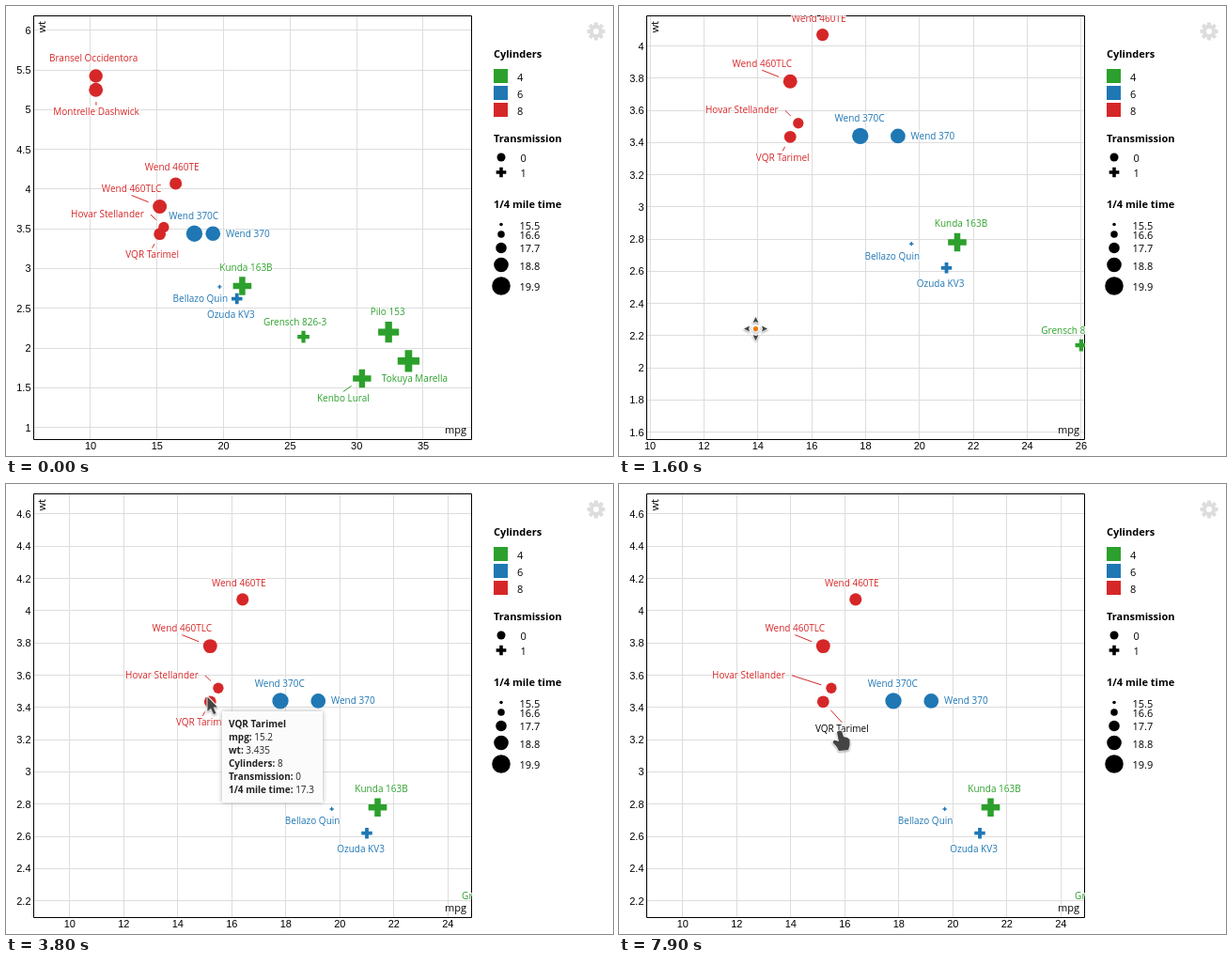
Write an HTML page with a canvas that moves like this. It is 646 by 479 pixels and loops after 8 s.

```html
<!DOCTYPE html>
<html lang="en">
<head>
<meta charset="utf-8">
<title>Scatter plot</title>
<style>
html, body { margin: 0; width: 100%; height: 100%; overflow: hidden; background: #fff; }
canvas { display: block; }
</style>
</head>
<body>
<canvas id="stage" width="646" height="479"></canvas>
<script>
const ctx = document.getElementById('stage').getContext('2d');
const LOOP = 8000, STEP = 100;
const PLOT = { left: 29.5, top: 10.5, right: 495.5, bottom: 461.5 };
const COLORS = { 4: '#2ca02c', 6: '#1f77b4', 8: '#d62728' };
const SANS = '"Open Sans", sans-serif';
const AXIS_FONT = '11px "Liberation Sans", Arial, sans-serif';
const INK = '#444';

// name, mpg, wt, quarter mile time, cylinders, label dx, label dy, leader side
const cars = [
  ['Bransel Occidentora', 10.4, 5.424, 17.82, 8, -2.5, -19],
  ['Montrelle Dashwick', 10.4, 5.25, 17.98, 8, 0.3, 23.5, 'v'],
  ['Wend 460TE', 16.4, 4.07, 17.4, 8, -4, -17.5],
  ['Wend 460TLC', 15.2, 3.78, 18, 8, -30, -19, 'v'],
  ['Hovar Stellander', 15.5, 3.52, 16.87, 8, -60, -14, 'h'],
  ['VQR Tarimel', 15.2, 3.435, 17.3, 8, -8, 22, 'v'],
  ['Wend 370C', 17.8, 3.44, 18.9, 6, -0.8, -18.5],
  ['Wend 370', 19.2, 3.44, 18.3, 6, 37, 0],
  ['Kunda 163B', 21.4, 2.78, 18.6, 4, 4, -19.5],
  ['Bellazo Quin', 19.7, 2.77, 15.5, 6, -20.5, 13],
  ['Ozuda KV3', 21, 2.62, 16.46, 6, -6.5, 17],
  ['Grensch 826-3', 26, 2.14, 16.7, 4, -9, -15.5],
  ['Pilo 153', 32.4, 2.2, 19.47, 4, -1, -21.5],
  ['Tokuya Marella', 33.9, 1.835, 19.9, 4, 6.5, 18.5],
  ['Kenbo Lural', 30.4, 1.615, 18.52, 4, -20, 21, 'v']
].map(([name, mpg, wt, qsec, cyl, dx, dy, leader]) =>
  ({ name, mpg, wt, qsec, cyl, dx, dy, leader, manual: mpg > 19.5 }));
const [sideCar, lowCar] = [cars[4], cars[5]];

// time, x, y
const pointerPath = [
  [200, 45, 138], [300, 95, 250], [400, 129, 314], [500, 145.5, 343.5],
  [1800, 145.5, 343.5], [2000, 145.5, 378], [2100, 145.5, 392.5], [2400, 180.5, 436.5],
  [3000, 180.5, 436.5], [3800, 214, 226], [4500, 214, 226], [4600, 223, 216],
  [4700, 223, 216], [4800, 227, 214], [5500, 227, 214], [5600, 211.5, 212.5],
  [5900, 190, 204], [6000, 190, 204], [6600, 162, 204], [6900, 200, 241],
  [7300, 208, 255], [7400, 208, 255], [7900, 236, 262]
];
const zoomPath = [[800, 1], [1000, 1.12], [1500, 1.93], [1600, 2.025], [1700, 2.03]];

// Linear interpolation over [time, ...values] keys.
function sample(keys, t) {
  if (t <= keys[0][0]) return keys[0].slice(1);
  const i = keys.findIndex(k => k[0] >= t);
  if (i < 0) return keys[keys.length - 1].slice(1);
  const a = keys[i - 1], b = keys[i], p = (t - a[0]) / (b[0] - a[0]);
  return a.slice(1).map((v, n) => v + (b[n + 1] - v) * p);
}

// The plot follows the dragging pointer one step late and settles on release.
function viewAt(t) {
  const [k] = sample(zoomPath, t);
  const dragTime = t >= 2900 ? 2400 : Math.min(Math.max(t - STEP, 1800), 2300);
  const [cx, cy] = sample(pointerPath, dragTime);
  const sx = 14.16 * k, sy = 84.55 * k;
  return {
    x: v => cx + (v - 13.92) * sx,
    y: v => cy - (v - 2.2425) * sy,
    mpg: px => 13.92 + (px - cx) / sx,
    wt: py => 2.2425 - (py - cy) / sy
  };
}

function ticks(min, max) {
  const raw = (max - min) / 10, power = 10 ** Math.floor(Math.log10(raw)), err = raw / power;
  const step = power * (err >= Math.sqrt(50) ? 10 : err >= Math.sqrt(10) ? 5 : err >= Math.SQRT2 ? 2 : 1);
  const out = [];
  for (let i = Math.ceil(min / step); i * step <= max; i++) out.push(+(i * step).toFixed(2));
  return out;
}

function text(str, x, y, { font = '11px ' + SANS, color = '#000', align = 'left', halo = false } = {}) {
  ctx.font = font;
  ctx.textAlign = align;
  if (halo) {
    ctx.strokeStyle = '#fff';
    ctx.lineWidth = 2;
    ctx.lineJoin = 'round';
    ctx.strokeText(str, x, y);
  }
  ctx.fillStyle = color;
  ctx.fillText(str, x, y);
}

function line(x1, y1, x2, y2, color) {
  ctx.strokeStyle = color;
  ctx.lineWidth = 1;
  ctx.beginPath();
  ctx.moveTo(x1, y1);
  ctx.lineTo(x2, y2);
  ctx.stroke();
}

function disc(x, y, r, color) {
  ctx.fillStyle = color;
  ctx.beginPath();
  ctx.arc(x, y, r, 0, 2 * Math.PI);
  ctx.fill();
}

function cross(x, y, area, color) {
  const r = Math.sqrt(area / 5) / 2;
  ctx.fillStyle = color;
  ctx.beginPath();
  ctx.rect(x - 3 * r, y - r, 6 * r, 2 * r);
  ctx.rect(x - r, y - 3 * r, 2 * r, 6 * r);
  ctx.fill();
}

function outlined(points) {
  ctx.beginPath();
  points.forEach(([x, y]) => ctx.lineTo(x, y));
  ctx.closePath();
  ctx.lineJoin = 'round';
  ctx.lineWidth = 2;
  ctx.strokeStyle = '#fff';
  ctx.stroke();
  ctx.fillStyle = INK;
  ctx.fill();
}

function drawAxes(view) {
  const { left, top, right, bottom } = PLOT;
  const crisp = v => Math.floor(v) + 0.5;
  for (const v of ticks(view.mpg(left), view.mpg(right))) {
    const x = view.x(v);
    line(crisp(x), top, crisp(x), bottom, '#ddd');
    text(v, x, 472, { font: AXIS_FONT, align: 'center' });
  }
  for (const v of ticks(view.wt(bottom), view.wt(top))) {
    const y = view.y(v);
    line(left, crisp(y), right, crisp(y), '#ddd');
    text(v, 26.5, y + 4, { font: AXIS_FONT, align: 'right' });
  }
  ctx.strokeStyle = '#000';
  ctx.strokeRect(left, top, right - left, bottom - top);
  text('mpg', 490, 455, { align: 'right', halo: true });
  ctx.save();
  ctx.translate(42, 16);
  ctx.rotate(-Math.PI / 2);
  text('wt', 0, 0, { align: 'right', halo: true });
  ctx.restore();
}

function labelShift(car, t) {
  const [x, y] = sample(pointerPath, t);
  if (car === sideCar && t > 6000) return t < 6600 ? [x - 190, 0] : [-28, 0];
  if (car === lowCar && t > 7400) return [x - 208, y - 255];
  return [0, 0];
}

function drawCars(view, t) {
  ctx.save();
  ctx.beginPath();
  ctx.rect(29, 10, 467, 452);
  ctx.clip();
  const held = t >= 7500 ? lowCar : t >= 6100 && t <= 6600 ? sideCar : null;
  const placed = cars.map(car => {
    const area = 10 + 290 * (car.qsec - 15.5) / 4.4, r = Math.sqrt(area / Math.PI);
    const x = view.x(car.mpg), y = view.y(car.wt), color = COLORS[car.cyl];
    if (car.manual) cross(x, y, area, color); else disc(x, y, r, color);
    return { car, x, y, r, color };
  });
  for (const { car, x, y, r, color } of placed) {
    const [sx, sy] = labelShift(car, t);
    const dx = car.dx + sx, dy = car.dy + sy;
    if (car.leader) {
      const ax = car.leader === 'h' ? dx + 46 : dx;
      const ay = car.leader === 'h' ? dy + 0.5 : dy - 7 * Math.sign(dy);
      const gap = (r + 5.5) / Math.hypot(ax, ay);
      line(x + ax, y + ay, x + ax * gap, y + ay * gap, color);
    }
    text(car.name, x + dx, y + dy + 3.5, {
      font: '10px ' + SANS, align: 'center', halo: true, color: car === held ? '#000' : color
    });
  }
  ctx.restore();
}

function drawLegend() {
  const title = (str, y) => text(str, 519, y, { font: 'bold 11px ' + SANS });
  title('Cylinders', 55);
  [4, 6, 8].forEach((cyl, i) => {
    ctx.fillStyle = COLORS[cyl];
    ctx.fillRect(519, 67 + 18 * i, 15, 15);
    text(cyl, 544, 80 + 18 * i);
  });
  title('Transmission', 145);
  disc(527, 161, 4.5, '#000');
  text('0', 547.5, 166);
  cross(527, 177, 64, '#000');
  text('1', 547.5, 182);
  title('1/4 mile time', 215);
  [[232.5, 238], [243, 248], [257.5, 262], [275.5, 281], [298, 303]].forEach(([cy, base], i) => {
    disc(527, cy, 1.78 + 2 * i, '#000');
    text((15.5 + 1.1 * i).toFixed(1), 546.5, base);
  });
}

function drawGear() {
  ctx.save();
  ctx.translate(628, 27);
  disc(0, 0, 7.2, '#ddd');
  for (let i = 0; i < 8; i++) {
    ctx.fillRect(-2, -9.5, 4, 4);
    ctx.rotate(Math.PI / 4);
  }
  disc(0, 0, 3.1, '#fff');
  ctx.restore();
}

function drawTooltip(car, x, y) {
  ctx.save();
  ctx.shadowColor = '#aaa';
  ctx.shadowBlur = 5;
  ctx.fillStyle = 'rgba(255,255,255,0.95)';
  ctx.fillRect(x, y, 107, 97);
  ctx.restore();
  const bold = 'bold 10px ' + SANS;
  text(car.name, x + 7, y + 17, { font: bold, color: '#222' });
  const rows = [['mpg:', car.mpg], ['wt:', car.wt], ['Cylinders:', car.cyl],
    ['Transmission:', 0], ['1/4 mile time:', car.qsec]];
  rows.forEach(([key, value], i) => {
    const base = y + 31 + 14 * i;
    text(key, x + 7, base, { font: bold, color: '#222' });
    const width = ctx.measureText(key + ' ').width;
    text(value, x + 7 + width, base, { font: '10px ' + SANS, color: '#222' });
  });
}

const pointers = {
  move() {
    disc(0, 0, 4.5, '#fff');
    for (let i = 0; i < 4; i++) {
      outlined([[0, -12.5], [3, -6.5], [0, -7.5], [-3, -6.5]]);
      ctx.rotate(Math.PI / 2);
    }
    disc(0, 0, 2.6, '#f57900');
  },
  arrow() {
    outlined([[0.5, 0.5], [0.5, 16], [4, 12.5], [7, 19], [9.5, 18], [6.5, 11.5], [11, 11.5]]);
  },
  hand() {
    outlined([[-4, 2], [-2, 0.5], [1, 1], [3, 7], [7, 8], [9.5, 10], [9.5, 16], [8, 21],
      [-2, 22], [-4, 18], [-8.5, 13], [-7, 10.5], [-2, 12]]);
  }
};

function pointerKind(t) {
  if (t >= 3800 && t < 5600) return 'arrow';
  if ((t >= 5700 && t <= 6600) || t >= 7300) return 'hand';
  return 'move';
}

function drawPointer(t) {
  if (t < 200) return;
  const [x, y] = sample(pointerPath, t), kind = pointerKind(t);
  if (kind === 'arrow') drawTooltip(t < 4600 ? lowCar : sideCar, x + 16, y + 16);
  ctx.save();
  ctx.translate(x, y);
  ctx.shadowColor = 'rgba(0,0,0,0.25)';
  ctx.shadowBlur = 2;
  ctx.shadowOffsetY = 1;
  pointers[kind]();
  ctx.restore();
}

function frame() {
  const t = Math.floor(performance.now() % LOOP / STEP) * STEP;
  const view = viewAt(t);
  ctx.fillStyle = '#fff';
  ctx.fillRect(0, 0, 646, 479);
  drawAxes(view);
  drawCars(view, t);
  drawLegend();
  drawGear();
  drawPointer(t);
  requestAnimationFrame(frame);
}
frame();
</script>
</body>
</html>
```
